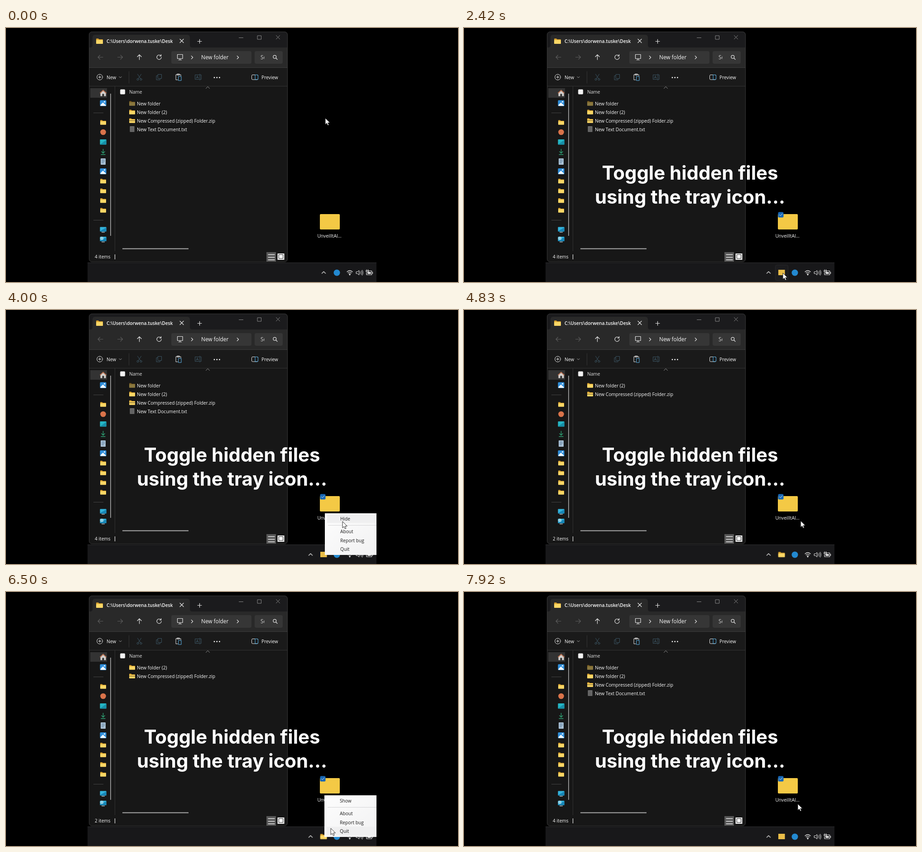
An HTML page that plays this animation: 998x561 px, repeating every 8 s.

```html
<!DOCTYPE html>
<html lang="en">
<head>
<meta charset="utf-8">
<title>Toggle hidden files</title>
<style>
html, body { margin: 0; width: 100%; height: 100%; overflow: hidden; background: #000; }
svg { display: block; width: 998px; height: 561px; }
text { font: 500 10.2px "Open Sans", "Noto Sans", sans-serif; fill: #fafafa; }
.line { fill: none; stroke: #e6e6e6; stroke-width: 1.2; stroke-linecap: round; stroke-linejoin: round; }
.dim { stroke: #5c5c5c; }
.cool { stroke: #3a5361; }
.thin { stroke-width: 1; }
.title { font-weight: 600; }
.crumb { font-size: 11.8px; }
.menu text { fill: #1c1c1c; }
.headline text { font: 700 41.9px Inter, "Open Sans", sans-serif; fill: #fff; text-anchor: middle; }

.headline { animation: headline 8s linear infinite; }
.pointer { animation: pointer 8s ease-in-out infinite; }
.picked, .hover, .tray, .chevron, .menu, .gone, .short, .rise, .trayhover, .rowhover {
  animation: 8s step-end infinite;
}
.picked { animation-name: picked; }
.hover { animation-name: hover; }
.tray { animation-name: tray; }
.chevron { animation-name: chevron; }
.menu { animation-name: menu; }
.gone { animation-name: gone; }
.short { animation-name: short; }
.rise { animation-name: rise; }
.trayhover { animation-name: trayhover; }
.rowhover { animation-name: rowhover; }

@keyframes headline { 0%, 1% { opacity: 0 } 7%, 100% { opacity: 1 } }
@keyframes picked { 0% { opacity: 0 } 13%, 100% { opacity: 1 } }
@keyframes hover { 0% { opacity: 0 } 9.8% { opacity: 1 } 23%, 100% { opacity: 0 } }
@keyframes tray { 0% { opacity: 0 } 24%, 100% { opacity: 1 } }
@keyframes chevron { 0% { transform: none } 24%, 100% { transform: translateX(-29px) } }
@keyframes menu {
  0% { opacity: 0; transform: none }
  34.4% { opacity: 1; transform: none }
  55.6% { opacity: 0; transform: translateX(-1px) }
  76% { opacity: 1; transform: translateX(-1px) }
  88.5%, 100% { opacity: 0 }
}
@keyframes gone { 0% { opacity: 1 } 56.25% { opacity: 0 } 89.4%, 100% { opacity: 1 } }
@keyframes short { 0% { opacity: 0 } 56.25% { opacity: 1 } 89.4%, 100% { opacity: 0 } }
@keyframes rise { 0% { transform: none } 56.25% { transform: translateY(-19px) } 89.4%, 100% { transform: none } }
@keyframes trayhover {
  0% { opacity: 0 } 28.5% { opacity: 1 } 38% { opacity: 0 }
  70.5% { opacity: 1 } 80.5%, 100% { opacity: 0 }
}
@keyframes rowhover {
  0% { transform: none } 41.5% { transform: translateY(-19px) } 43% { transform: translateY(-39px) }
  46% { transform: translateY(-67px) } 56% { transform: none }
  82.5% { transform: translateY(-19px) } 83.5% { transform: translateY(-39px) }
  85% { transform: translateY(-67px) } 89%, 100% { transform: none }
}
@keyframes pointer {
  0%, 2% { transform: translate(705px, 199px) }
  11.5%, 21% { transform: translate(723px, 460px) }
  30%, 36.5% { transform: translate(704px, 541px) }
  38.5% { transform: translate(709px, 533px); animation-timing-function: ease-out }
  47%, 50% { transform: translate(743px, 467px) }
  53%, 58% { transform: translate(745px, 462px); animation-timing-function: ease-in }
  70.875% { transform: translate(714px, 530px); animation-timing-function: ease-out }
  74%, 78% { transform: translate(703px, 541px); animation-timing-function: ease-in }
  81.25% { transform: translate(717px, 522px); animation-timing-function: ease-out }
  86.5%, 92% { transform: translate(742px, 461px) }
  98%, 100% { transform: translate(737px, 468px) }
}
</style>
</head>
<body>
<svg viewBox="0 0 998 561">
  <defs>
    <g id="folder">
      <path d="M-6.5 4.5V-4q0-1 1-1h3.2l1.6 1.6h6.2q1 0 1 1v6.9z" fill="#d9a22e"/>
      <rect x="-6.5" y="-2.2" width="13" height="7.4" rx=".9" fill="#fbd766"/>
    </g>
    <g id="picture">
      <rect x="-7" y="-6.5" width="14" height="13" rx="1.5" fill="#2f8fdc"/>
      <path d="M-6 6V4L-.5-1.5 6 4.5V6z" fill="#f2f8fd"/>
      <circle cx="3" cy="-3" r="1.5" fill="#fff"/>
    </g>
    <g id="monitor">
      <rect x="-7" y="-6" width="14" height="10" rx="1" fill="#35b4dc"/>
      <path d="M-7 3 7-5V3q0 1-1 1H-6z" fill="#1787b8"/>
      <path d="M-3.5 5.5h7" stroke="#b9c6cc" stroke-width="1.4"/>
    </g>
    <path id="cross" d="M-4-4 4 4M4-4-4 4"/>
    <path id="right" d="M-1.8-3.4 1.6 0-1.8 3.4"/>
    <path id="up" d="M-4 2 0-2 4 2"/>
    <path id="arrow" d="M5.5 0H-5.5M-1-4.5-5.5 0-1 4.5"/>
    <linearGradient id="paper" x2="1" y2="1">
      <stop stop-color="#fdfdfd"/><stop offset="1" stop-color="#f1f1f2"/>
    </linearGradient>
    <clipPath id="searchClip"><path d="M555 52h15.5v26H555z"/></clipPath>
    <clipPath id="frame"><rect x="183" y="8" width="439" height="509" rx="7"/></clipPath>
    <clipPath id="screen"><path d="M180 0h638v561H180z"/></clipPath>
  </defs>

  <rect width="998" height="561"/>

  <!-- Window -->
  <g clip-path="url(#frame)">
    <path d="M183 8h439v509H183z" fill="#171717"/>
    <path d="M183 8h439v36H183z" fill="#1b1b1d"/>
    <path d="M183 43h439v44H183z" fill="#292929"/>
    <path d="M186 43q5 0 5-5V21q0-6 6-6h203q6 0 6 6v17q0 5 5 5z" fill="#292929"/>
    <path d="M183 87h439v42H183z" fill="#1a1a1a"/>
    <path d="M183 87.5h439" stroke="#3d3d3d"/>
    <path d="M183 128.5h439M240.5 129v364" stroke="#333"/>
  </g>
  <rect x="183.5" y="8.5" width="438" height="508" rx="6.5" fill="none" stroke="#383838"/>

  <!-- Tab and title buttons -->
  <use href="#folder" transform="translate(206.5 29) scale(1.15)"/>
  <text class="title" x="222" y="33">C:\Users\dorwena.tuske\Desk</text>
  <g class="line">
    <use href="#cross" x="388" y="28.5"/>
    <path d="M423 29.5h9M427.5 25v9"/>
  </g>
  <g class="line thin" style="stroke:#8a8a8a">
    <path d="M514.5 21.5h9M555.5 17h8v8h-8z"/>
    <use href="#cross" x="600.5" y="20.5"/>
  </g>

  <!-- Navigation -->
  <g class="line">
    <use href="#arrow" x="208.5" y="64.5" class="dim"/>
    <use href="#arrow" transform="translate(252 64.5) rotate(180)" class="dim"/>
    <use href="#arrow" transform="translate(294.5 64.5) rotate(90)"/>
    <path d="M342 61.5a5 5 0 1 0 1 3M342.5 58.5V62H339"/>
  </g>
  <rect x="365" y="51" width="177" height="28" rx="4" fill="#363636"/>
  <rect x="549" y="51" width="62" height="28" rx="4" fill="#363636"/>
  <g class="line">
    <path d="M378.5 58.5H390v9h-11.5zM381 70.5h6.5M384.2 67.5v3"/>
    <use href="#right" x="411" y="65"/>
    <use href="#right" x="512" y="65"/>
    <circle cx="593.3" cy="63.7" r="3.4"/>
    <path d="m596 66.5 3 3"/>
  </g>
  <text class="crumb" x="431" y="69">New folder</text>
  <g clip-path="url(#searchClip)"><text class="crumb" x="562" y="69" opacity=".8">Search</text></g>

  <!-- Commands -->
  <g class="line thin">
    <circle cx="207" cy="108.5" r="6.3"/>
    <path d="M204 108.5h6M207 105.5v6"/>
    <path d="m250 107.5 2.5 2.5 2.5-2.5" stroke="#aaa"/>
    <path d="M271.5 96v26" stroke="#353535"/>
    <g class="cool">
      <path d="m290.5 102 6.5 10M298.5 102l-6.5 10"/>
      <circle cx="291" cy="113.5" r="2"/><circle cx="298" cy="113.5" r="2"/>
      <path d="M335.5 102.5h8v9h-8zM335 105.5h-3v9h8v-3"/>
      <path d="M427 103.5h-9.5v10h9.5M429 103.5h2v10h-2M428 101.5v14M420 111.5l2.5-6 2.5 6M421 109.5h3"/>
    </g>
    <path d="M379 114.5h-4V103h11v3M378 101.5h5v2.5h-5z"/>
    <path d="M381 107h6v9h-6z" stroke="#5fb6ea"/>
    <rect x="542.5" y="103.5" width="14" height="10.5" rx="2"/>
    <path d="M550.5 103.5h4q2 0 2 2v6.5q0 2-2 2h-4z" stroke="#4fb0e8"/>
  </g>
  <g fill="#eee">
    <circle cx="460" cy="109.5" r="1.4"/><circle cx="465.7" cy="109.5" r="1.4"/><circle cx="471.4" cy="109.5" r="1.4"/>
  </g>
  <text x="222" y="113">New</text>
  <text x="564" y="113">Preview</text>

  <!-- Sidebar -->
  <path d="M186 133h37v21h-37z" fill="#333"/>
  <path d="M208.5 150.5v-7l6-5.5 6 5.5v7h-4v-5h-4v5z" fill="#d3d0cd"/>
  <path d="m207.5 144 7-6.5 7 6.5" fill="none" stroke="#b9704f" stroke-width="1.8"/>
  <use href="#picture" x="214.5" y="166"/>
  <path d="M193 187.5h22M193 424.5h22" stroke="#444"/>
  <use href="#folder" x="214.5" y="208.5"/>
  <circle cx="214.5" cy="230" r="6.3" fill="#d9734a"/>
  <rect x="207.5" y="246" width="14" height="11.5" rx="1" fill="#25b5c4"/>
  <path d="M207.5 257.5 221.5 247v10.5z" fill="#178fa8"/>
  <path d="M214.5 267v9M210.5 272.5l4 4 4-4M209.5 279.5h10" fill="none" stroke="#2fa878" stroke-width="1.3"/>
  <rect x="209" y="288" width="11" height="14" rx="1" fill="#a9c0d4"/>
  <path d="M211 291.5h7M211 294.5h7M211 297.5h5" stroke="#4e7392"/>
  <use href="#picture" x="214.5" y="316.5"/>
  <use href="#folder" x="214.5" y="338"/>
  <use href="#folder" x="214.5" y="359.5"/>
  <use href="#folder" x="214.5" y="381"/>
  <use href="#folder" x="214.5" y="402.5"/>
  <use href="#monitor" x="214.5" y="445.5"/>
  <use href="#monitor" x="214.5" y="467"/>
  <circle cx="211.5" cy="464.5" r="3.8" fill="#8fd0e6"/>
  <path d="M231 145v314" stroke="#9b9b9b" stroke-width="1.8"/>

  <!-- File list -->
  <rect x="252" y="135.5" width="11" height="11" rx="2" fill="#f3f3f3" stroke="#777" stroke-width=".6"/>
  <text x="272" y="145" style="fill:#e2e2e2">Name</text>
  <use href="#up" x="445.5" y="131.5" class="line thin" style="stroke:#999"/>
  <g class="gone">
    <use href="#folder" x="278.5" y="166.5" opacity=".5"/>
    <text x="289" y="171">New folder</text>
    <rect x="273.5" y="217" width="10" height="12.5" fill="#6f6f6f"/>
    <path d="M275 220.5h7M275 223.5h7M275 226.5h7" stroke="#4a4a4a"/>
    <text x="289" y="228">New Text Document.txt</text>
  </g>
  <g class="rise">
    <use href="#folder" x="278.5" y="185.5"/>
    <text x="289" y="190">New folder (2)</text>
    <use href="#folder" x="278.5" y="204.5"/>
    <path d="M272 204.8h13" stroke="#8d7434" stroke-width="1.6"/>
    <text x="289" y="209">New Compressed (zipped) Folder.zip</text>
  </g>
  <path d="M257 487.5h146" stroke="#a9a9a9" stroke-width="1.8"/>

  <!-- Status bar -->
  <text class="gone" x="196" y="509">4 items</text>
  <text class="short" x="196" y="509">2 items</text>
  <path d="M240.5 500v11" stroke="#ddd" stroke-width="1.3"/>
  <rect x="575" y="495" width="21" height="21" fill="#565656"/>
  <path d="M578.5 500.5h15M578.5 506.5h15M578.5 512h15" stroke="#f0f0f0" stroke-width="1.6"/>
  <rect x="600" y="498.5" width="14" height="13" fill="#eee" stroke="#eee"/>
  <rect x="602.5" y="500.5" width="9" height="8.5" fill="#fff" stroke="#333"/>

  <!-- Desktop item -->
  <rect class="hover" x="682" y="405" width="66" height="62" rx="2" fill="#222327"/>
  <rect x="693" y="411" width="44" height="34" rx="2" fill="#f4c945"/>
  <g class="picked">
    <rect x="693.5" y="406.5" width="12" height="12" rx="2.5" fill="#1767b5"/>
    <path d="m696.5 412.5 2.2 2.2 4-4.2" class="line thin"/>
  </g>
  <text x="714" y="463" text-anchor="middle">UnveilItAl...</text>

  <!-- Taskbar -->
  <path d="M180 518h638v43H180z" fill="#18181a"/>
  <path d="M180 518.5h638" stroke="#303032"/>
  <use class="line chevron" href="#up" x="701.5" y="540"/>
  <rect class="trayhover" x="687.5" y="523.5" width="28" height="34" rx="3" fill="#1c1c1e" stroke="#27272a"/>
  <g class="tray">
    <rect class="gone" x="694" y="534" width="14.5" height="12" fill="#e9bd48"/>
    <use class="short" href="#folder" transform="translate(701.2 540) scale(1.12)"/>
  </g>
  <circle cx="730.5" cy="540.5" r="7" fill="#2389d0"/>
  <g class="line">
    <path d="M753 538.5q6-5.5 12 0M755.3 541q3.7-3.2 7.4 0M757.4 543.3q1.6-1.4 3.2 0"/>
    <circle cx="759" cy="545" r=".8"/>
    <path d="M773.5 538.5h2.5l3.5-3v10l-3.5-3h-2.5zM782 538q1.7 2.5 0 5M784.3 536.2q3 4.3 0 8.6M786.5 534.8q3.7 5.7 0 11.4" class="thin"/>
    <path d="M799 536.5h8.5v8.5H796v-5M809.5 539v3.5"/>
    <path d="M796 533.5v4M799.5 533.5v4M795 536h5.5v2q-2.7 2.5-5.5 0z" class="thin"/>
    <path d="M799 539.5h6v3h-6z" fill="#e6e6e6"/>
  </g>

  <g class="headline">
    <text x="499" y="335">Toggle hidden files</text>
    <text x="499" y="388">using the tray icon...</text>
  </g>

  <!-- Tray menu -->
  <g clip-path="url(#screen)">
    <g class="menu">
      <path d="M704 449h120v92H704z" fill="url(#paper)"/>
      <path class="rowhover" d="M709 518.5h115v19H709z" fill="#efeff0"/>
      <path d="M711 475.5h113" stroke="#d4d4d6"/>
      <text class="gone" x="738" y="465">Hide</text>
      <text class="short" x="738" y="465">Show</text>
      <text x="738" y="493">About</text>
      <text x="738" y="513">Report bug</text>
      <text x="738" y="532">Quit</text>
    </g>
  </g>

  <path class="pointer" d="M0 0V14.2L3.3 11.2 5.5 16.2 7.9 15.2 5.7 10.3H10.2Z" fill="#fff" stroke="#111" stroke-width=".9"/>
</svg>
</body>
</html>
```
